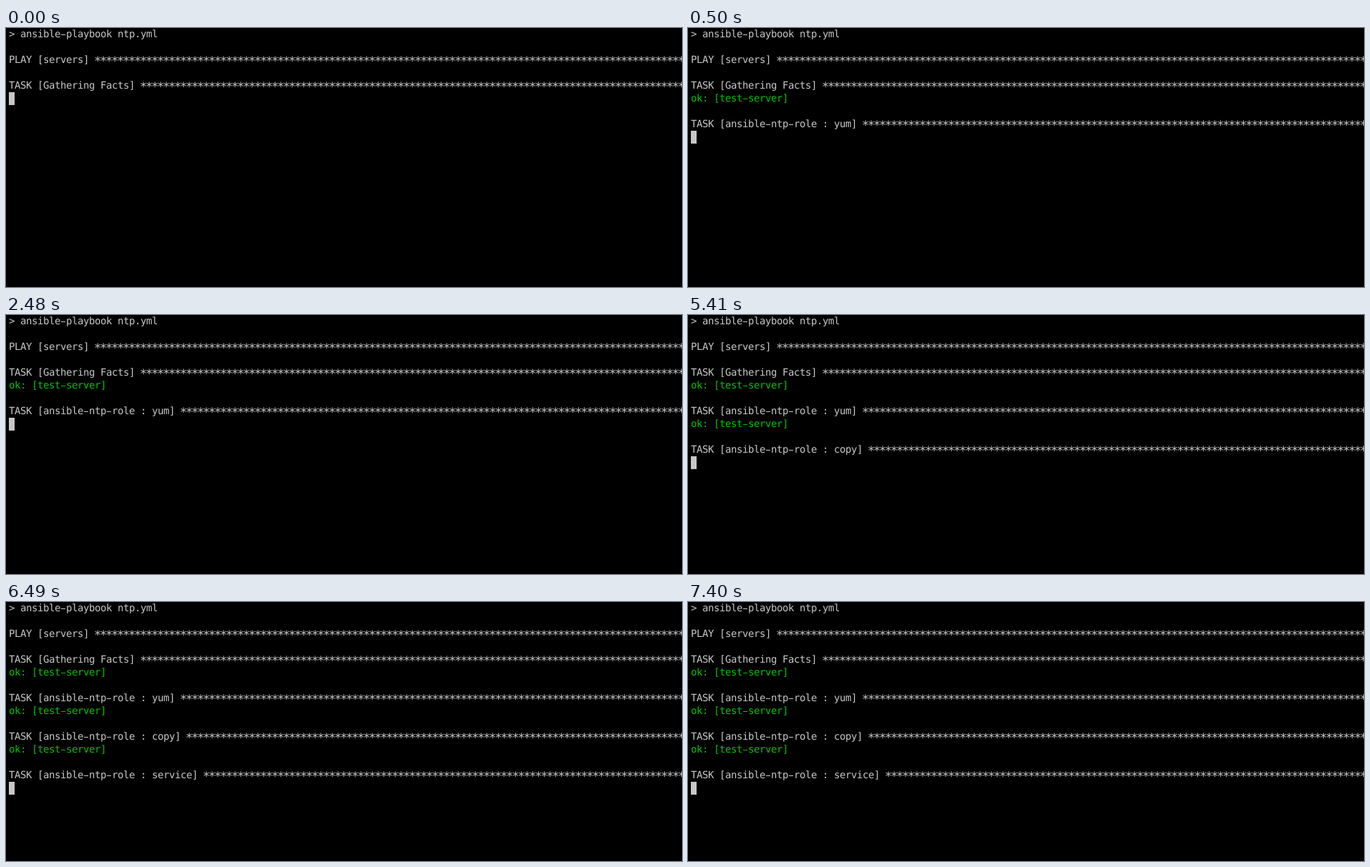
An HTML page that plays this animation: 945x363 px, repeating every 8000 ms.

```html
<!DOCTYPE html>
<html lang="en">
<head>
<meta charset="utf-8">
<title>Playbook run</title>
<style>
  html, body { margin: 0; width: 100%; height: 100%; overflow: hidden; background: #000; }
  #term {
    position: relative; width: 945px; height: 363px; overflow: hidden;
    color: #c7c7c7; font: 14px/18px "DejaVu Sans Mono", monospace;
    text-rendering: geometricPrecision; white-space: pre;
  }
  .row { position: absolute; left: 4px; height: 18px; letter-spacing: calc(8px - 0.602em); }
  .ok { color: #00c200; }
  /* Large stars that meet their neighbours, centred on the capitals. */
  .stars {
    position: relative; top: 3px; font-size: 17px; line-height: 0;
    letter-spacing: calc(8px - 0.602em); margin-left: -1px;
  }
  /* Wide hyphen: the character stays, the bar is drawn behind it. */
  .dash {
    -webkit-text-fill-color: transparent; display: inline-block; height: 18px; vertical-align: top;
    background: linear-gradient(currentColor, currentColor) 1px 9px / 6px 1px no-repeat;
  }
  #cursor { position: absolute; left: 4px; width: 8px; height: 18px; background: #c7c7c7; }
</style>
</head>
<body>
<div id="term"><div id="cursor"></div></div>
<script>
const LOOP = 8000, LINE = 18, COLS = 118;
const term = document.getElementById('term');
const cursor = document.getElementById('cursor');

const banner = title => (title + ' ').padEnd(COLS, '*');
const ok = 'ok: [test-server]';

// Each step prints its lines at once; the cursor waits on the next row.
const steps = [
  { at: 0, lines: ['> ansible-playbook ntp.yml', '', banner('PLAY [servers]'), '', banner('TASK [Gathering Facts]')] },
  { at: 500, lines: [ok, '', banner('TASK [ansible-ntp-role : yum]')] },
  { at: 3800, lines: [ok, '', banner('TASK [ansible-ntp-role : copy]')] },
  { at: 6490, lines: [ok, '', banner('TASK [ansible-ntp-role : service]')] }
];

const markup = text => text
  .replace('>', '&gt;')
  .replace(/-/g, '<span class="dash">-</span>')
  .replace(/\*+/, '<span class="stars">$&</span>');

let count = 0;
for (const step of steps) {
  step.rows = step.lines.map(text => {
    const row = document.createElement('div');
    row.className = text === ok ? 'row ok' : 'row';
    row.style.top = count++ * LINE + 'px';
    row.innerHTML = markup(text);
    return term.appendChild(row);
  });
  step.end = count;
}

const start = performance.now();
function draw(now) {
  const t = Math.max(0, now - start) % LOOP;
  for (const step of steps) {
    const shown = t >= step.at;
    for (const row of step.rows) row.hidden = !shown;
    if (shown) cursor.style.top = step.end * LINE + 'px';
  }
  requestAnimationFrame(draw);
}
draw(start);
</script>
</body>
</html>
```
